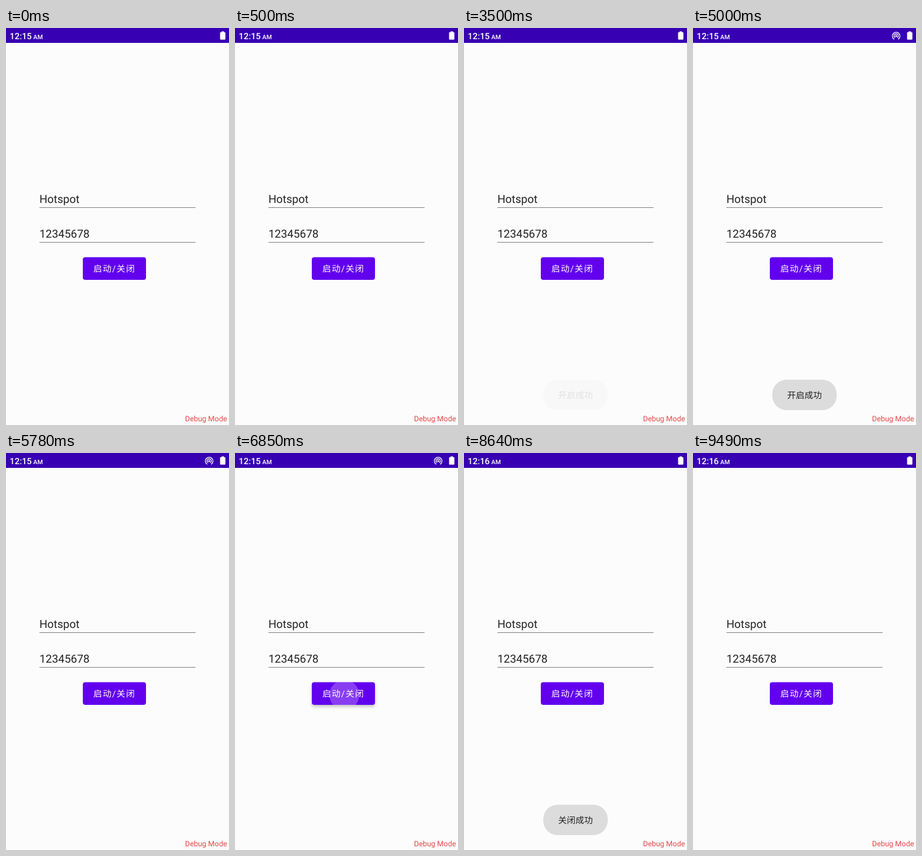
Animation, 360 px wide and 640 px high, one loop 9.56 s. Source, as an HTML page:

```html
<!DOCTYPE html>
<html lang="zh">
<head>
<meta charset="utf-8">
<title>Hotspot switch</title>
<style>
html, body { margin: 0; height: 100%; overflow: hidden; background: #fcfcfc; }
svg { display: block; width: 100%; height: 100%; font-family: Roboto, "Noto Sans CJK SC", "Noto Sans CJK", sans-serif; white-space: pre; text-rendering: geometricPrecision; }
.field { font-size: 18px; fill: #212121; }
.cjk { font-size: 14px; }
</style>
</head>
<body>
<svg viewBox="0 0 360 640">
  <defs>
    <clipPath id="shape"><rect x="124" y="369.5" width="102" height="36.5" rx="4"/></clipPath>
    <filter id="blur" x="-20%" y="-50%" width="140%" height="200%"><feGaussianBlur stdDeviation="2.5"/></filter>
  </defs>

  <rect width="360" height="24" fill="#3700b3"/>
  <g fill="#fff">
    <text id="clock" x="6" y="18" font-size="14" font-weight="500">12:15</text>
    <text x="44" y="17.5" font-size="10" font-weight="500">AM</text>
    <path d="M348 5.5h4v1.3h1.2q1 0 1 1v10q0 1-1 1h-6.6q-1 0-1-1v-10q0-1 1-1h1.4z"/>
    <g id="tether">
      <circle cx="328" cy="13" r="1.5"/>
      <path d="M326.2 15.8a3.4 3.4 0 1 1 3.6 0M324.8 18.2a6.1 6.1 0 1 1 6.4 0" fill="none" stroke="#fff" stroke-width="1.3"/>
    </g>
  </g>

  <text class="field" x="54" y="282">Hotspot</text>
  <rect x="54" y="289" width="252" height="1" fill="#848484"/>
  <text class="field" x="54" y="337.5">12345678</text>
  <rect x="54" y="345" width="252" height="1" fill="#848484"/>

  <rect id="shadow" x="124" y="372" width="102" height="37" rx="4" filter="url(#blur)"/>
  <g clip-path="url(#shape)">
    <rect x="124" y="369" width="102" height="38" fill="#6200ee"/>
    <circle id="ripple" cx="176.5" cy="390" fill="#fff"/>
  </g>
  <text class="cjk" x="141" y="393" fill="#fff" letter-spacing="1.25">启动/关闭</text>

  <g id="toast">
    <rect x="128" y="567" width="104" height="49" rx="23" fill="#dcdcdc"/>
    <text id="message" class="cjk" x="180" y="597" text-anchor="middle" fill="#212121"></text>
  </g>
  <text x="289" y="633.5" font-size="12" fill="#e34848">Debug Mode</text>
</svg>
<script>
const LOOP = 9560;
const el = id => document.getElementById(id);
const clamp = x => Math.min(1, Math.max(0, x));
const ramp = (t, from, to) => clamp((t - from) / (to - from));
const smooth = x => x * x * (3 - 2 * x);

const presses = [2480, 6690];
const toasts = [
  { text: "开启成功", show: 3380, full: 4400, hide: 5300, end: 5780 },
  { text: "关闭成功", show: 6990, full: 8040, hide: 8940, end: 9480 }
];

function drawPress(t) {
  const age = t - (t < presses[1] ? presses[0] : presses[1]);
  el("ripple").setAttribute("r", 14 + 40 * smooth(ramp(age, 0, 490)));
  el("ripple").setAttribute("opacity", 0.24 * ramp(age, 0, 75) * (1 - ramp(age, 320, 660)));
  el("shadow").setAttribute("opacity", 0.22 * ramp(age, 0, 100) * (1 - ramp(age, 350, 500)));
}

function drawToast(t) {
  const toast = toasts[t < toasts[1].show ? 0 : 1];
  el("message").textContent = toast.text;
  el("toast").setAttribute("opacity",
    ramp(t, toast.show, toast.full) * (1 - ramp(t, toast.hide, toast.end)));
}

function frame() {
  const t = performance.now() % LOOP;
  el("clock").textContent = t < 8640 ? "12:15" : "12:16";
  el("tether").setAttribute("opacity", t >= 4500 && t < 7000 ? 1 : 0);
  drawPress(t);
  drawToast(t);
  requestAnimationFrame(frame);
}
frame();
</script>
</body>
</html>
```
